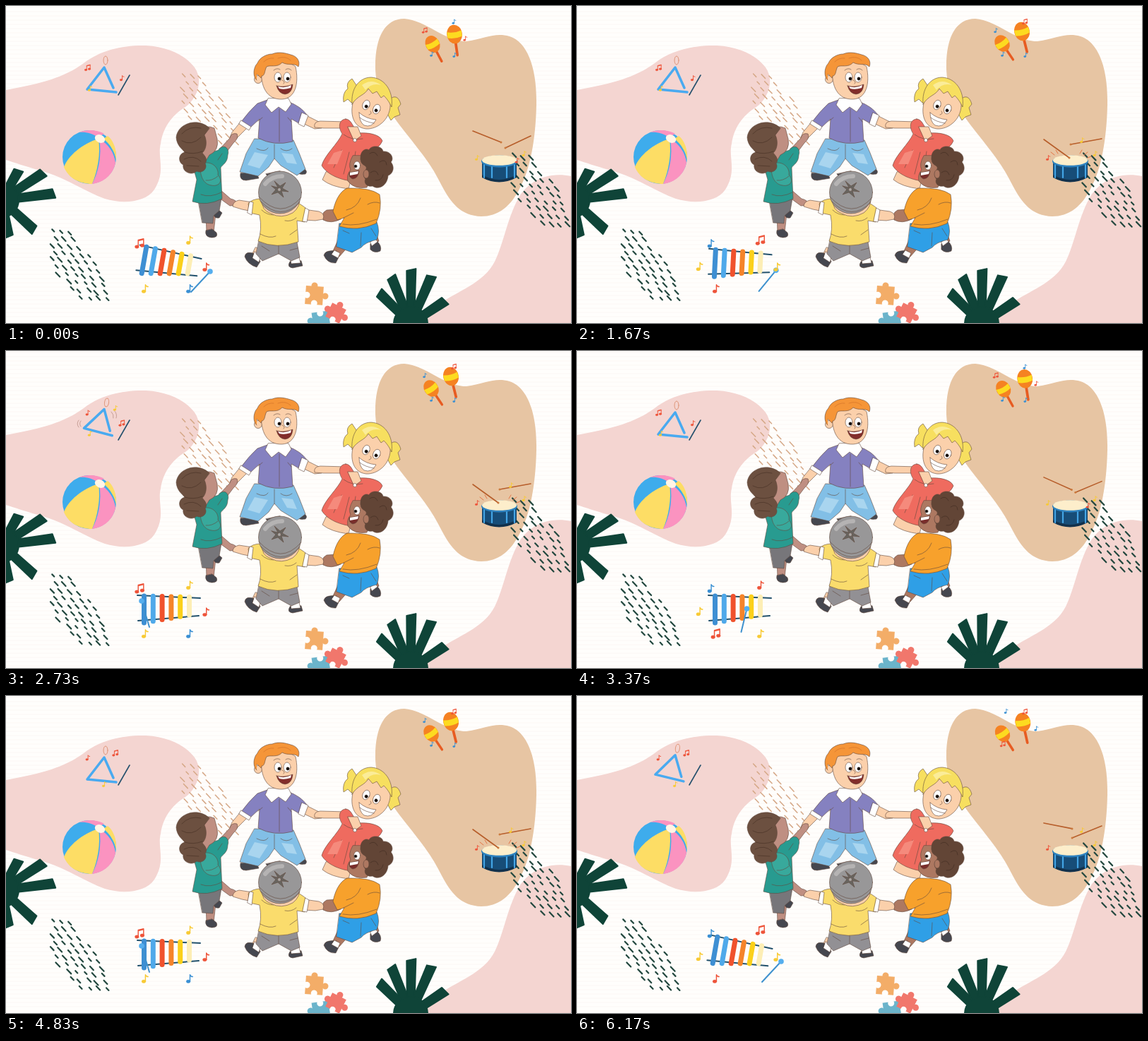
Recreate the animation shown at these times as an HTML page. Size 800x449 px, loop 6230 ms.

```html
<!DOCTYPE html>
<html lang="en">
<meta charset="utf-8">
<title>Music circle</title>
<style>
html,body{margin:0;width:100%;height:100%;overflow:hidden;background:#fffefc}
svg{display:block;width:100vw;height:100vh}
.kid{stroke:#62483d;stroke-width:.6;stroke-linejoin:round;stroke-linecap:round}
.n{stroke:none}.l{fill:none}
.fair{fill:#fbd0ab}.tan{fill:#bf8f82}.brown{fill:#ad7861}.white{fill:#fff}.dark{fill:#45474f}
</style>
<svg viewBox="0 0 800 449" preserveAspectRatio="none">
<defs><pattern id="paper" width="800" height="6" patternUnits="userSpaceOnUse"><path d="M0 2H800" stroke="#f8f3ed" opacity=".6"/></pattern></defs>
<rect width="800" height="449" fill="url(#paper)"/>
<g fill="#f4d5d1">
<path d="M0 119C50 110 83 101 110 81 134 62 168 55 198 56 232 58 255 71 267 87 281 107 269 132 254 143 233 156 222 174 219 195 214 215 227 233 210 260 198 278 166 281 140 273 110 262 83 242 45 232 28 227 12 222 0 218Z"/>
<path d="M585 449 614 422C640 403 676 393 692 362 705 336 710 298 728 268 744 244 772 235 800 241V449Z"/>
</g>
<path fill="#e7c5a3" d="M523 90C522 45 536 18 564 18 594 20 621 50 652 50 680 46 692 37 713 43 738 51 752 87 751 140 750 190 742 230 729 255 715 285 696 298 673 298 640 297 627 274 612 245 597 215 570 187 548 156 532 135 524 115 523 90Z"/>
<g id="dashes" stroke-linecap="round"></g>
<g id="leaves" fill="#0f4438" stroke="#0f4438" stroke-width="2" stroke-linejoin="round"></g>

<!-- beach ball -->
<circle cx="118" cy="214" r="38" fill="#3eacec"/>
<path fill="#fddd65" d="M131 188C108 195 88 212 82 228 88 243 103 252 122 252 130 232 134 210 131 188Z"/>
<path fill="#fb93c0" d="M132 188C136 212 131 235 122 252 139 250 152 238 155 222 153 207 145 196 132 188ZM130 186C122 180 112 178 104 179 115 174 130 176 139 181Z"/>
<path fill="#fddd65" d="M138 188C148 196 154 207 156 218 157 203 152 190 144 184Z"/>
<ellipse cx="133" cy="188" rx="7.5" ry="5.5" fill="#fff5e6" transform="rotate(25 133 188)"/>

<!-- puzzle pieces -->
<g fill="#fffefc">
<g transform="translate(437 410) rotate(4)"><g fill="#f3ad68"><path d="M-13-13H12V13H-13Z"/><circle cx="-1" cy="-14" r="4.5"/><circle cx="15" r="4.5"/></g><circle cx="-11" r="4.5"/><circle cy="11" r="4.5"/></g>
<g transform="translate(446 444) rotate(-8)"><g fill="#6bb4cb"><path d="M-12-11H12V14H-12Z"/><circle cx="-15" r="4.5"/></g><circle cy="-9" r="4.5"/></g>
<g transform="translate(467 435) rotate(27)"><g fill="#f1776c"><path d="M-11-11H11V11H-11Z"/><circle cy="-13" r="4.5"/><circle cx="14" r="4.5"/><circle cx="-13" r="4.5"/></g><circle cy="10" r="4"/></g>
</g>

<!-- boy in purple -->
<g class="kid">
<path class="dark" d="M332 237Q330 247 340 247L358 244 354 235ZM368 238Q374 248 386 242L388 234ZM410 232Q411 240 424 238 428 234 421 229Z"/>
<path fill="#82bfe6" d="M352 188 407 190 415 208 424 231 412 240 389 226 380 216 372 228 357 241 331 235 340 209Z"/>
<path class="n" fill="#a9d5ef" d="M352 207 371 211 359 230 342 225ZM390 208 406 210 412 224 398 222Z"/>
<path class="l" d="M380 196V216M355 202Q367 208 371 201M389 202Q397 208 405 202"/>
<path class="fair" d="M331 166 343 171 329 185Q321 194 317 186L320 179ZM421 153 441 163Q449 166 447 173L437 174 420 166Z"/>
<path fill="#8581c0" d="M370 133 356 138Q344 149 333 164L346 172 359 160 357 187Q379 199 406 192L404 160 418 168 426 154Q417 142 401 136Z"/>
<path class="white" d="M333 162 347 171 344 176 330 167ZM419 151 428 155 422 171 414 167ZM371 131 367 140 376 151 386 143 396 150 404 139 400 131Z"/>
<path class="l" d="M387 146V192M357 163 363 158M404 164 399 158"/>
<circle class="fair" cx="357" cy="104" r="5.5"/>
<path class="fair" d="M362 86C372 77 401 77 410 86 415 109 410 131 391 132 370 133 359 115 362 86Z"/>
<path fill="#f59538" d="M355 105C349 100 350 87 356 81 359 73 369 68 377 68 386 64 397 67 403 69 412 71 417 78 414 86 408 80 400 85 391 80 384 88 374 83 369 86 366 91 367 99 362 99 361 106 359 97 355 97 355 105Z"/>
<path class="l" stroke="#cf6e28" d="M365 79Q371 73 379 74M385 74Q396 70 403 77"/>
<ellipse class="white" cx="385" cy="101" rx="5" ry="7"/><ellipse class="white" cx="398" cy="101" rx="5" ry="7"/>
<circle cx="387" cy="103" r="2.2"/><circle cx="399" cy="103" r="2.2"/>
<path fill="#822d2b" d="M383 113Q394 116 406 111 405 124 395 125 386 124 383 113Z"/><path class="white n" d="M385 114Q395 117 404 112L403 116Q394 119 387 117Z"/>
<path class="l" d="M379 91Q384 87 388 90M396 90Q400 87 404 91M391 105Q396 107 393 110"/>
</g>

<!-- girl in red -->
<g class="kid">
<path class="fair" d="M482 164 445 163Q435 164 437 172L450 173 478 173ZM453 235 448 246Q460 256 485 259L490 239Z"/>
<path fill="#ef6b5f" d="M481 160C471 161 470 172 476 181 470 195 451 211 447 226 455 239 473 247 497 249L508 206Q528 204 533 191C529 181 511 179 499 180 492 175 490 160 481 160Z"/>
<path class="l" d="M478 182Q490 191 505 188M475 204 464 229M486 207 478 238M495 206 490 239"/>
<path class="n" fill="#f58a7c" d="M464 208 477 204 469 224 455 224Z"/>
<path class="fair" d="M484 171 498 171 503 184 493 191Z"/><circle class="white" cx="494" cy="190" r="2.5"/>
<path fill="#f7df5f" d="M500 118 490 103Q481 108 484 117 476 123 478 136L484 132 489 137Q498 132 500 118ZM542 133Q554 122 559 139L555 144 558 154 550 157 545 162 540 153Q537 142 542 133Z"/>
<path class="fair" d="M495 126C503 110 535 114 544 136 546 160 526 175 510 174 489 172 485 147 495 126Z"/>
<path fill="#f7df5f" d="M490 139C488 117 500 101 517 101 535 102 549 119 546 143 542 135 539 131 535 127L531 130 525 121 519 124 513 117C508 127 498 126 490 139Z"/>
<path class="n" fill="#fbec98" d="M504 112Q517 102 531 112 518 108 509 119Z"/>
<g transform="rotate(22 517 144)"><ellipse class="white" cx="509" cy="143" rx="5" ry="7"/><ellipse class="white" cx="525" cy="143" rx="5" ry="7"/><circle cx="510" cy="145" r="2.2"/><circle cx="525" cy="145" r="2.2"/></g>
<path class="white" d="M500 151Q510 160 524 161 518 173 507 169 500 164 500 151Z"/>
<path class="l" d="M501 158Q508 164 521 166M516 149Q519 153 514 154"/>
</g>

<!-- girl in teal -->
<g class="kid">
<path class="tan" d="M302 203 317 187Q319 179 327 181 330 187 322 194L310 210ZM283 294 284 321 294 321 297 294ZM295 253 318 273Q328 275 327 282L317 283 291 264Z"/>
<path class="dark" d="M283 318Q281 327 291 328 301 328 298 321L292 316ZM294 291Q293 302 302 300L306 293 300 288Z"/>
<path fill="#77767a" d="M272 274 305 272 302 290 294 297 293 308 278 307Z"/>
<path fill="#289b90" d="M281 213C286 204 302 207 302 202 310 195 317 203 314 211 314 222 306 225 304 229L306 273Q284 284 264 277L270 246 266 232Z"/>
<path fill="#38a99c" d="M276 224C290 217 302 229 300 239 309 250 299 256 291 254 280 253 273 240 276 224Z"/>
<path class="l" d="M283 247Q292 248 300 241M276 267Q289 272 305 264M306 209 300 218"/>
<path class="tan" d="M268 174Q284 168 295 173L299 188Q302 205 288 211L282 221 267 214Z"/>
<path fill="#6c5040" d="M288 173C272 157 243 166 241 186 242 198 249 202 253 207 243 210 244 222 251 225 249 235 263 241 270 234 278 238 286 230 282 223 287 216 279 210 278 208 284 203 285 191 281 183Z"/>
<path class="l" stroke="#453024" d="M249 181Q260 169 276 173M249 191Q263 199 276 186M253 207Q265 211 278 206M252 217Q266 210 276 220M256 226 273 227"/>
</g>

<!-- boy in orange -->
<g class="kid">
<path class="brown" d="M469 334 462 349 472 355 485 340ZM511 328 520 339 528 333 524 321Z"/>
<path class="dark" d="M468 347Q452 345 450 353 455 365 467 364L471 356ZM516 337 523 331Q533 339 530 347 522 351 516 345Z"/>
<path class="white" d="M465 346 473 350 470 357 461 352ZM516 334 523 329 526 334 518 340Z"/>
<path fill="#2f9fe6" d="M472 308 525 306Q530 319 525 331 508 335 503 342L490 349 468 341Z"/>
<path class="l" d="M503 321 502 340M477 318 486 322M517 315 524 326"/>
<path class="brown" d="M469 288 454 289Q445 294 449 303 460 309 474 302Z"/>
<path fill="#f7a12c" d="M483 258C471 263 465 280 463 291L469 303 479 300 472 312Q497 320 524 308 533 287 529 267 516 257 483 258Z"/>
<path class="l" d="M482 289Q497 286 502 272M478 300 492 293M512 281Q521 276 529 279M477 309Q498 313 525 302"/>
<path class="brown" d="M491 212Q484 224 488 232 482 239 484 248 493 260 511 257L521 236 509 212Z"/>
<path fill="#624536" d="M502 217C501 204 510 201 514 204 517 196 533 198 534 206 545 205 550 216 545 221 552 230 546 239 541 240 540 255 527 261 519 255 511 257 506 250 509 245 506 243 505 235 509 233 514 224 502 228 502 217Z"/>
<path class="l" stroke="#3e2b21" d="M515 209Q522 204 526 212M529 221Q538 215 539 225M516 236Q524 230 527 239M523 247Q532 248 534 239"/>
<ellipse class="white" cx="497" cy="226" rx="4.5" ry="6"/><circle cx="495" cy="227" r="2"/>
<path fill="#792e2b" d="M486 236Q493 235 500 233 499 244 491 245 485 243 486 236Z"/><path class="white n" d="M487 236 499 234 498 238 487 240Z"/>
<ellipse class="brown" cx="510" cy="238" rx="4" ry="6"/>
</g>

<!-- boy with cap -->
<g class="kid">
<path class="fair" d="M349 278 330 275Q321 277 321 284L334 288 349 291ZM422 288 443 291Q452 294 449 302L438 304 420 303ZM353 342 347 354 357 361 366 348ZM401 351 405 366 414 364 413 350Z"/>
<path class="dark" d="M353 351Q339 346 338 355 342 366 355 370L360 362ZM402 362Q397 370 406 371L420 368 418 361Z"/>
<path class="white" d="M352 348 361 353 358 363 349 357ZM403 358 415 356 417 364 404 365Z"/>
<path fill="#929094" d="M359 329 411 329 416 356 404 361 386 351 363 361 354 351Z"/>
<path class="l" d="M386 338V351M362 340 373 347M402 346 413 343"/>
<path fill="#fadc6c" d="M361 273Q348 273 343 280L345 293 359 296Q363 317 357 333 383 345 414 334L412 304 423 306 428 290Q416 277 402 276Z"/>
<path class="white" d="M345 277 350 278 348 296 342 293ZM424 286 429 289 426 306 420 305Z"/>
<path class="l" d="M362 289Q369 296 379 296M411 300Q404 306 395 304M360 323Q373 330 382 326M412 317 402 324"/>
<path class="fair" d="M363 275Q361 289 375 294 390 302 406 293 417 285 416 270Z"/>
<ellipse cx="388" cy="264" rx="30.5" ry="30" fill="#989798"/>
<path class="l" stroke="#b5b3b3" stroke-width="6" d="M367 252Q376 241 391 241"/>
<path fill="#67645f" d="M385 257 380 248 388 255 396 250 391 258 400 263 390 262 393 271 385 264 376 267 382 260 376 255Z"/>
<path class="l" d="M358 270Q389 304 418 271M361 277Q389 306 416 278"/>
<circle cx="387" cy="260" r="2.5" fill="#a9a7a5"/>
</g>
<g id="live" stroke-linecap="round" stroke-linejoin="round"></g>
</svg>
<script>
const byId = id => document.getElementById(id);
const live = byId('live');

let seed = 7;
const rand = () => (seed = seed * 16807 % 2147483647) / 2147483647;
const mix = (a, b, p) => a + (b - a) * p;

// Eased rise from 0 to 1 between two steps.
function ramp(s, from, to) {
  const p = Math.min(1, Math.max(0, (s - from) / (to - from)));
  return p * p * (3 - 2 * p);
}
const line = (x1, y1, x2, y2, color, w) =>
  `<path d="M${x1} ${y1}L${x2} ${y2}" stroke="${color}" stroke-width="${w}"/>`;

// Slanted field of short, slightly uneven dashes.
function dashes(x0, y0, color, w) {
  let out = '';
  for (let row = 0; row < 10; row++) {
    const y = y0 + row * 10;
    const right = x0 + Math.min(81, 29 + row * 8.5);
    for (let x = x0 + Math.max(0, row - 5) * 9 + row % 2 * 5; x < right; x += 12) {
      const k = 1.5 + rand() * 1.6, dx = rand() * 3, dy = (x - x0) * .1 + rand() * 3;
      out += line(x + dx - k, y + dy - k, x + dx + k, y + dy + k * 1.1, color, w);
    }
  }
  return out;
}
byId('dashes').innerHTML = dashes(64, 317, '#23483f', 2.2) +
  dashes(717, 211, '#23483f', 2.2) + dashes(249, 96, '#d5a887', 1.5);

// Palm fan: fingers widen towards their tips.
const fan = (x, y, fingers) => fingers.map(([turn, len]) =>
  `<path transform="translate(${x} ${y}) rotate(${turn})" d="M-5 4L-7 ${3 - len} 6 ${-len} 5 4Z"/>`).join('') +
  `<circle cx="${x}" cy="${y}" r="24"/>`;
byId('leaves').innerHTML = fan(573, 450, [[-45, 64], [-22, 73], [1, 78], [24, 75], [57, 60]]) +
  fan(-6, 275, [[30, 50], [57, 72], [83, 76], [133, 64], [170, 54]]);

// Notes sit on a ring; one letter per spot, capitals are paired notes.
const colors = {r: '#ee5339', b: '#398fd3', y: '#f8ca35'};
function ring(x, y, rx, ry, angles, letters, size) {
  return angles.map((angle, i) => {
    const kind = letters[i], c = colors[kind.toLowerCase()], a = angle * Math.PI / 180;
    if (!c) return '';
    const shape = kind < 'a'
      ? '<ellipse cx="-4" cy="5" rx="3" ry="2.4"/><ellipse cx="4" cy="3" rx="3" ry="2.4"/><path d="M-2 5V-5L6-7V3M-2-4 6-6" fill="none" stroke-width="1.5"/>'
      : '<ellipse cx="-1.5" cy="4" rx="3" ry="2.4"/><path d="M1 4V-6Q2-3 5-3" fill="none" stroke-width="1.5"/>';
    return `<g transform="translate(${x + rx * Math.cos(a)} ${y + ry * Math.sin(a)}) scale(${size})" fill="${c}" stroke="${c}" stroke-width=".3">${shape}</g>`;
  }).join('');
}

const bars = ['#3e8fd3', '#4fa9ea', '#f0522d', '#f5842a', '#fbd01a', '#fdeeb5'];
function xylophone(n) {
  const s = n % 30;
  const u = 1 - ramp(s, 3, 7) + ramp(s, 9, 27);
  const turn = 10 * u ** 16 - 7 * Math.sin(Math.PI * ramp(s, 9, 17));
  const hx = mix(192, 289, u), hy = mix(354, 376, u);
  const body = line(186, 346, 275, 350, '#22516c', 2) + line(187, 382, 273, 375, '#22516c', 2) +
    bars.map((c, i) => {
      const x = 195.5 + 12.8 * i;
      return line(x, 347 + .3 * i, x, 385 - 2.2 * i, c, 7);
    }).join('');
  return `<g transform="rotate(${turn} 230 363)">${body}</g>` +
    line(hx, hy, mix(203, 262, u), mix(391, 405, u), '#3e91ce', 2) +
    `<circle cx="${hx}" cy="${hy}" r="3.8" fill="#55aeee"/>` +
    ring(228, 366, 55, 42, [-135, -55, 5, 55, 125, 176], ['Ryrby-', 'br-yRy', 'bRy-ry'][s / 10 | 0], .95);
}

function triangle(n) {
  const s = n % 24, phase = s / 8 | 0;
  const strike = ramp(s, 5, 8) - ramp(s, 10, 15);
  const lift = 9 * (ramp(s, 5, 8) - ramp(s, 10, 20));
  const turn = 9 * (ramp(s, 10, 13) - ramp(s, 15, 20));
  const hx = mix(175, 136, strike), hy = mix(98, 109, strike);
  const tx = mix(159, 154, strike), ty = mix(126, 138, strike);
  const buzz = '<path d="M106 99q-3 4 0 8m-3-9q-4 5 0 10M149 86q4 4 3 9m1-11q5 5 3 11" stroke="#a77a70" stroke-width=".6"/>';
  return `<g fill="none"><g transform="translate(0 ${-lift}) rotate(${turn} 139 87)">
    <ellipse cx="141" cy="77" rx="3" ry="6" stroke="#df9578"/>
    <path d="M152 116L139 87 115 118 156 122" stroke="#49aaf0" stroke-width="3.5"/></g>` +
    line(hx, hy, tx, ty, '#24506c', 1.6) + (phase === 1 ? buzz : '') + '</g>' +
    ring(138, 100, 26, 25, [-150, -50, 5, 88, 138], ['R-r-y', 'ryR-y', 'rR-y-'][phase], .62);
}

const maraca = (x, y, turn, size) => `<g transform="translate(${x} ${y}) rotate(${turn}) scale(${size})">
  <path d="M0 0V29" stroke="#e75c22" stroke-width="3.6"/><ellipse rx="10.5" ry="13" fill="#f58222"/>
  <path d="M-10-4Q0-1 10-4L10 4Q0 7-10 4Z" fill="#fddb20"/></g>`;

const drum = `<path d="M674 219V241Q698 255 723 241V219Z" fill="#174d78"/>
  <path d="M674 239Q698 253 723 239V243Q698 256 674 243Z" fill="#12314c"/>` +
  [677, 688, 709, 720].map(x => line(x, 225, x, 243, '#43a4e4', 2.2)).join('') +
  '<ellipse cx="698.5" cy="220" rx="25.5" ry="8.5" fill="#2e82bf"/><ellipse cx="698.5" cy="218.5" rx="24.5" ry="7.3" fill="#fdeecb"/>';
const sparks = '<path d="M676 211 671 207M681 209 678 204M712 209 715 204M718 211 723 207M723 215 728 213" stroke="#e57545"/>';

function drumAndShakers(n) {
  const s = n % 15, phase = s / 5 | 0;
  const shake = ramp(s, 2, 6) - ramp(s, 12, 15);
  const hit = ramp(s, 2, 6) - ramp(s, 9, 12);
  const raise = Math.sin(Math.PI * ramp(s, 9, 15));
  const stick = (x, y, tx, ty) => line(x, y, tx, ty, '#b75e2b', 1.6) +
    `<circle cx="${tx}" cy="${ty}" r="1.5" fill="#cb793d"/>`;
  return maraca(604 - 2 * shake, 54 - shake, -28 - 6 * shake, .95) +
    maraca(635 - 5 * shake, 40 - 4 * shake, -8 - 6 * shake, 1.03) + drum +
    stick(661, 177 + 12 * hit + 4 * raise, 701 - 4 * hit, 193 + 22 * hit - 7 * raise) +
    stick(743, 184 + 4 * hit, 707 - 8 * shake, 201 - 5 * hit) + (phase === 1 ? sparks : '') +
    ring(620, 46, 30, 27, [-155, -115, -62, 0, 60, 125], ['R-brbb', 'b-R-bb', '-bRb-R'][phase], .55) +
    ring(698, 206, 36, 18, [-62, 10, 45, 150], ['-yry', 'yy-r', 'yy-r'][phase], .6);
}

let shown = -1;
function draw(now) {
  const n = Math.min(88, Math.floor((now % 6230 + 10) / 70));
  if (n !== shown) live.innerHTML = xylophone(n) + triangle(n) + drumAndShakers(n);
  shown = n;
  requestAnimationFrame(draw);
}
draw(0);
</script>
</html>
```
